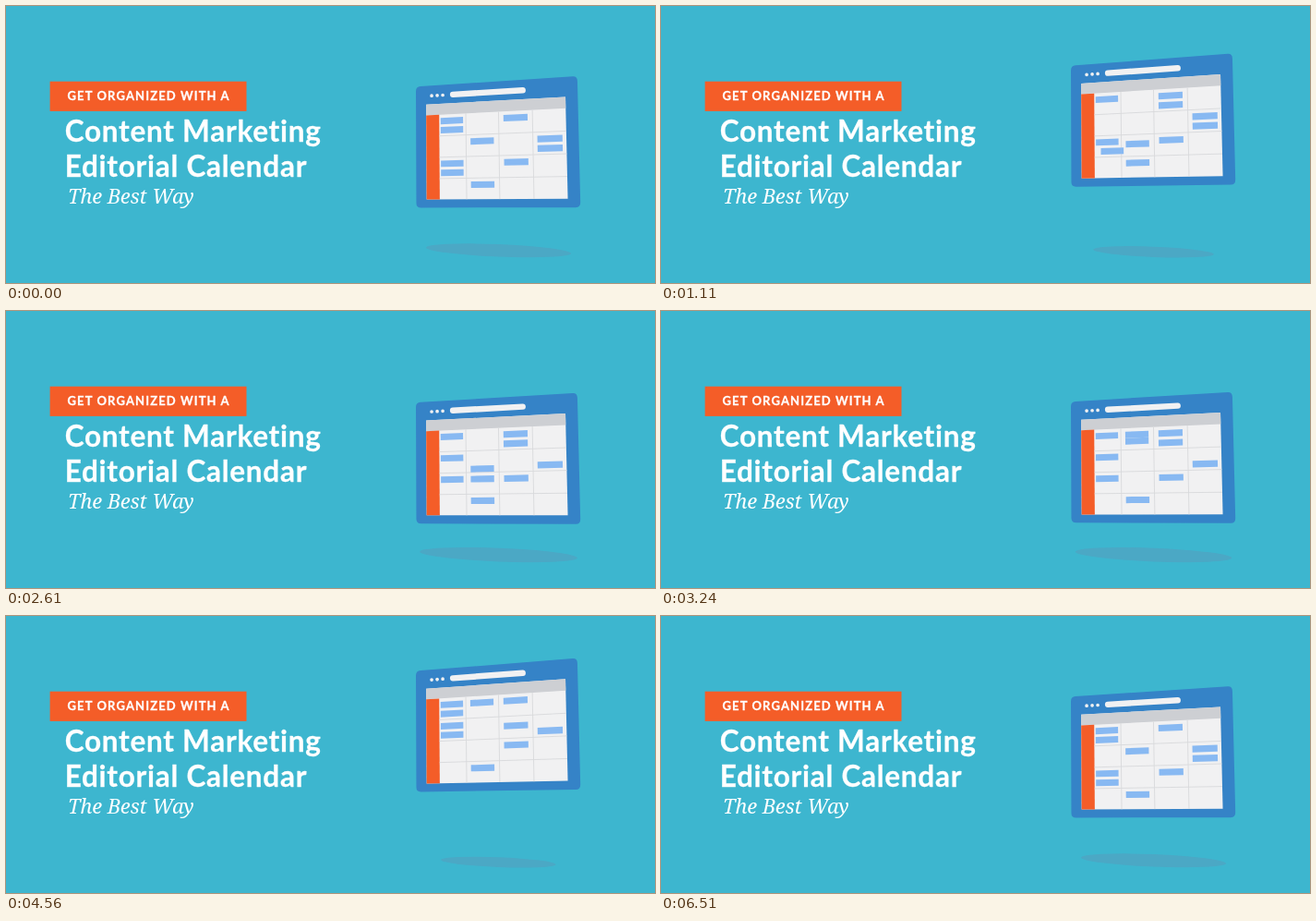
An HTML page that plays this animation: 703 px wide and 300 px high, repeating every 6.54 s.

```html
<!DOCTYPE html>
<html lang="en">
<head>
<meta charset="utf-8">
<title>Editorial Calendar</title>
<style>
  html, body { margin: 0; width: 100%; height: 100%; overflow: hidden; background: #3db6cf; }
  svg { display: block; width: 703px; height: 300px; }
  text { fill: #fff; stroke: #fff; stroke-width: .3px; }
  .sans { font-family: Lato, "Open Sans", sans-serif; font-weight: 700; }
  .title { font-size: 31.5px; letter-spacing: .74px; }
  .kicker { font-size: 13px; letter-spacing: 1.12px; }
  .tagline { font: italic 22px "Noto Serif", "DejaVu Serif", serif; letter-spacing: -.15px; stroke: none; }
</style>
</head>
<body>
<svg viewBox="0 0 703 300">
  <rect width="703" height="300" fill="#3db6cf"/>
  <rect x="47.6" y="81.7" width="212.9" height="32.2" fill="#f45d28"/>
  <text class="sans kicker" x="66.5" y="102">GET ORGANIZED WITH A</text>
  <text class="sans title" x="63.7" y="147">Content Marketing</text>
  <text class="sans title" x="63.7" y="184.5">Editorial Calendar</text>
  <text class="tagline" x="67" y="214">The Best Way</text>
  <ellipse id="shadow" cx="533.5" fill="#4ba8c5"/>
  <g id="window"></g>
</svg>
<script>
const LOOP = 6540, STEP = 30;
const HORIZON = 222, LEFT = 444, WIDTH = 174, HEIGHT = 131, GROWTH = 0.085;

// Height of the window's top right corner at the turning points of its float.
const FLOAT = [[0, 76], [1300, 50], [2900, 92], [4630, 45.5], [6480, 76], [LOOP, 76]];

const COLUMN_X = [482.6, 515, 551.2, 587.8];
const GRID_X = [469, 497.7, 533, 569.5];
const ROW_TOP = 31.5, ROW_HEIGHT = 22.8;
const SHEET = { left: 455, top: 20, right: 605.5, bottom: 122.2 };

// Each event: starting slot [column, row, half], then moves [time, duration, slot].
const EVENTS = [
  { at: [0, 0, 0], moves: [] },
  { at: [2, 0, 0], moves: [] },
  { at: [1, 3, 0], moves: [] },
  { at: [2, 2, 0], moves: [] },
  { at: [3, 1, 1], moves: [] },
  { at: [0, 0, 1], moves: [[150, 600, [2, 0, 1]], [4185, 500, [2, 1, 0]], [5900, 500, [3, 1, 0]]] },
  { at: [3, 1, 0], moves: [[1600, 650, [0, 1, 0]], [4760, 500, [0, 2, 0]]] },
  { at: [0, 2, 0], moves: [[3230, 500, [0, 1, 1]], [4760, 500, [0, 2, 1]]] },
  { at: [1, 1, 0], moves: [[735, 500, [1, 2, 0]], [2850, 500, [1, 0, 1]], [3850, 500, [0, 0, 1]]] },
  { at: [0, 2, 1], moves: [[1020, 500, [1, 2, 1]], [2466, 500, [1, 0, 0]], [5330, 500, [1, 1, 0]]] },
];

const NS = "http://www.w3.org/2000/svg";
const windowGroup = document.getElementById("window");
const shadow = document.getElementById("shadow");

function addPath(attributes) {
  const path = document.createElementNS(NS, "path");
  for (const name in attributes) path.setAttribute(name, attributes[name]);
  return windowGroup.appendChild(path);
}

const clamp = v => Math.max(0, Math.min(1, v));
const smooth = v => v * v * (3 - 2 * v);
const mix = (a, b, p) => a + (b - a) * p;

const frame = addPath({ fill: "#3583c7" });
const sheet = addPath({ fill: "#f1f1f2" });
const header = addPath({ fill: "#cdcfd3" });
const sidebar = addPath({ fill: "#f45d28" });
const grid = addPath({ fill: "none", stroke: "#d9dadc", "stroke-width": 0.9 });
const dots = addPath({ stroke: "#f1f1f2", "stroke-width": 3.7, "stroke-linecap": "round" });
const address = addPath({ stroke: "#f1f1f2", "stroke-width": 6.4, "stroke-linecap": "round" });
const bars = EVENTS.map(() => addPath({ fill: "#88b9f2" }));

function floatAt(t) {
  const i = FLOAT.findIndex(key => key[0] > t);
  const [t0, y0] = FLOAT[i - 1], [t1, y1] = FLOAT[i];
  return mix(y0, y1, (1 - Math.cos(Math.PI * (t - t0) / (t1 - t0))) / 2);
}

function slotPoint([column, row, half]) {
  return [COLUMN_X[column], ROW_TOP + row * ROW_HEIGHT + 7 + half * 9.7];
}

// Ease towards each slot, pass it by a few pixels, then settle.
function eventPoint(event, t) {
  let [x, y] = slotPoint(event.at);
  for (const [start, duration, slot] of event.moves) {
    if (t < start) break;
    const u = clamp((t - start) / duration);
    const [tx, ty] = slotPoint(slot);
    const dx = tx - x, dy = ty - y, length = Math.hypot(dx, dy);
    const past = u > 0.55 ? 3 * Math.sin(Math.PI * (u - 0.55) / 0.45) / length : 0;
    const p = smooth(clamp(u / 0.7)) + past;
    x += dx * p;
    y += dy * p;
  }
  return [x, y];
}

function makeProjector(top) {
  const origin = HORIZON + (top - HORIZON) / (1 + GROWTH);
  return (x, y) => {
    const across = (x - LEFT) / WIDTH;
    const px = x + (0.5 + 3 * across) * y / HEIGHT;
    const py = HORIZON + (origin + y - HORIZON) * (1 + GROWTH * across);
    return px.toFixed(2) + " " + py.toFixed(2);
  };
}

function render(t) {
  const top = floatAt(t);
  const at = makeProjector(top);
  const line = (x0, y0, x1, y1) => `M${at(x0, y0)}L${at(x1, y1)}`;
  const quad = (x0, y0, x1, y1) =>
    `M${at(x0, y0)}L${at(x1, y0)}L${at(x1, y1)}L${at(x0, y1)}Z`;
  const rounded = (x0, y0, x1, y1, r) =>
    `M${at(x0 + r, y0)}L${at(x1 - r, y0)}Q${at(x1, y0)} ${at(x1, y0 + r)}` +
    `L${at(x1, y1 - r)}Q${at(x1, y1)} ${at(x1 - r, y1)}` +
    `L${at(x0 + r, y1)}Q${at(x0, y1)} ${at(x0, y1 - r)}` +
    `L${at(x0, y0 + r)}Q${at(x0, y0)} ${at(x0 + r, y0)}Z`;
  const draw = (path, d) => path.setAttribute("d", d);

  draw(frame, rounded(LEFT, 0, LEFT + WIDTH + 0.8, HEIGHT, 5));
  draw(sheet, quad(SHEET.left, SHEET.top, SHEET.right, SHEET.bottom));
  draw(header, quad(SHEET.left, SHEET.top, SHEET.right, ROW_TOP));
  draw(sidebar, quad(SHEET.left, ROW_TOP, GRID_X[0], SHEET.bottom));

  const columns = GRID_X.slice(1).map(x => line(x, ROW_TOP, x, SHEET.bottom));
  const rows = [1, 2, 3].map(i => ROW_TOP + i * ROW_HEIGHT)
    .map(y => line(GRID_X[0], y, SHEET.right, y));
  draw(grid, columns.concat(rows).join(""));

  draw(dots, [461, 467, 473].map(x => line(x, 10.8, x + 0.01, 10.8)).join(""));
  draw(address, line(484, 10.8, 559.5, 10.8));

  EVENTS.forEach((event, i) => {
    const [x, y] = eventPoint(event, t);
    const half = 12.1 + 1.4 * (x - COLUMN_X[0]) / 106;
    draw(bars[i], quad(x - half, y - 3.4, x + half, y + 3.4));
  });

  const reach = 62.5 + 0.536 * (top - 46);
  shadow.setAttribute("rx", reach);
  shadow.setAttribute("ry", reach * 0.086);
  shadow.setAttribute("cy", 266.6 - (top - 46) * 0.06);
  shadow.setAttribute("transform", "rotate(2.3 533.5 266)");
}

const begin = performance.now();
function tick() {
  const t = (performance.now() - begin) % LOOP;
  render(Math.floor(t / STEP) * STEP);
  requestAnimationFrame(tick);
}
tick();
</script>
</body>
</html>
```
